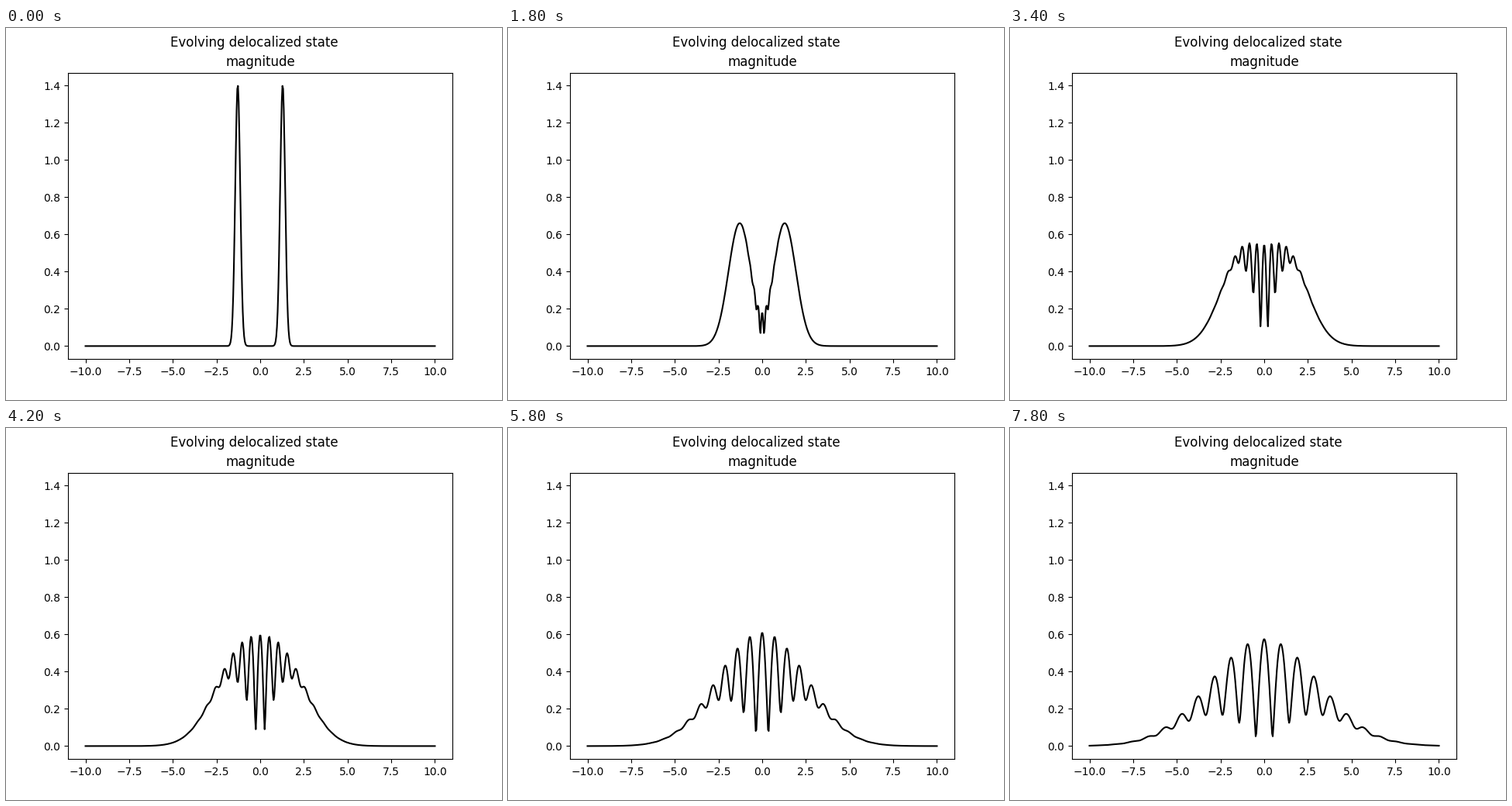
These frames come from a looping animation (640 px wide and 480 px high, 8 s). A matplotlib script:

```python
import numpy as np
import matplotlib.pyplot as plt
from matplotlib.animation import FuncAnimation

FRAMES, INTERVAL = 40, 200   # 8 s loop
DT = 0.01                    # time per frame, hbar = m = 1
X0 = 9 / 7                   # packet centres at +-X0
VAR = 1 / 98                 # initial position variance

x = np.linspace(-10, 10, 512)


def packet(center, t):
    """Freely spreading Gaussian wave packet at rest."""
    spread = 1 + 1j * t / (2 * VAR)
    norm = (2 * np.pi * VAR) ** -0.25 / np.sqrt(spread)
    return norm * np.exp(-(x - center) ** 2 / (4 * VAR * spread))


def magnitude(t):
    return np.abs(packet(-X0, t) + packet(X0, t)) / np.sqrt(2)


plt.rcParams["font.family"] = "DejaVu Sans"
fig, ax = plt.subplots(figsize=(6.4, 4.8), dpi=100)
fig.suptitle("Evolving delocalized state")
ax.set_title("magnitude")
line, = ax.plot(x, magnitude(0), color="black", lw=1.5)
ax.set_xlim(-11, 11)
ax.set_ylim(-0.07, 1.47)


def update(i):
    line.set_ydata(magnitude(i * DT))
    return line,


anim = FuncAnimation(fig, update, frames=FRAMES, interval=INTERVAL,
                     repeat=True, repeat_delay=0)
plt.show()
```
